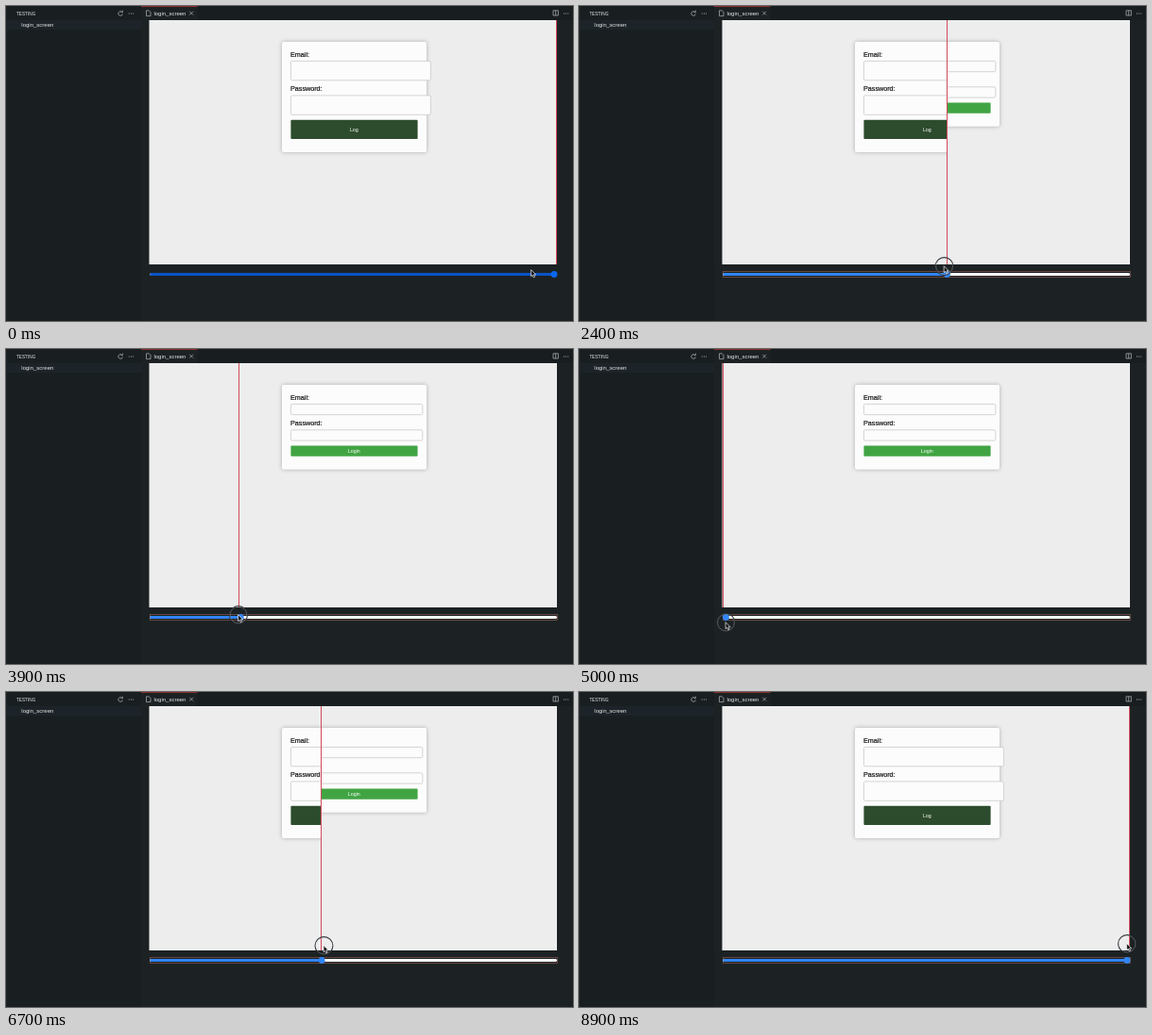
Animation of 600x334 px, one loop 9 s. Source, as an HTML page:

```html
<!DOCTYPE html>
<html lang="en">
<head>
<meta charset="utf-8">
<title>Screen comparison slider</title>
<style>
  html, body { margin: 0; width: 100%; height: 100%; overflow: hidden; background: #1c2224; }
  svg { display: block; width: 600px; height: 334px; font-family: "Liberation Sans", Arial, sans-serif; }
  .card { fill: #fcfcfc; filter: drop-shadow(0 0 2px rgba(0, 0, 0, .28)); }
  .field { fill: #fcfcfc; stroke: #c9c9c9; stroke-width: .8; }
  .label { font-size: 7.2px; fill: #111; stroke: #111; stroke-width: .2; }
  .caption { font-size: 5.3px; fill: #fff; text-anchor: middle; }
  .ui { font-size: 6px; fill: #e4e7e8; }
  .icon { fill: none; stroke: #b4b9bb; stroke-width: .7; }
  .dots { stroke: #c8cccd; stroke-width: 1; stroke-linecap: round; stroke-dasharray: 0 2.2; }
</style>
</head>
<body>
<svg viewBox="0 0 600 334">
  <defs>
    <clipPath id="stage"><rect x="151.7" y="15" width="431.3" height="259"/></clipPath>
    <clipPath id="before"><rect id="leftClip" x="151" y="15" height="259"/></clipPath>
  </defs>

  <rect width="600" height="334" fill="#1c2224"/>
  <rect width="143" height="334" fill="#191f21"/>
  <rect width="1" height="334" fill="#1f2629"/>
  <rect x="1" y="15" width="142" height="10" fill="#1d2429"/>
  <rect x="143" width="457" height="15" fill="#181e20"/>
  <rect x="143" width="59.5" height="15" fill="#1c2224"/>
  <rect x="143" width="59.5" height=".8" fill="#a8322f"/>
  <text class="ui" x="11" y="9.6" style="font-size:4.7px">TESTING</text>
  <text class="ui" x="16.3" y="22">login_screen</text>
  <text class="ui" x="156.4" y="10">login_screen</text>
  <path class="icon" d="M122.6 6.2A2.3 2.3 0 1 0 123.4 8.4M123.4 4.6V6.6H121.4M148.5 4.8H151.3L153 6.5V10.6H148.5ZM194.3 5.8L198 9.5M198 5.8L194.3 9.5M579 4.8H584.4V10H579ZM581.7 4.8V10"/>
  <path class="dots" d="M130.2 8h5M590.4 8h5"/>

  <g clip-path="url(#stage)">
    <g id="afterForm"></g>
    <g id="beforeForm" clip-path="url(#before)"></g>
    <path id="divider" d="M.5 15V274" stroke="#d04a5a"/>
  </g>

  <rect id="focus" x="152.5" y="281.5" width="431" height="6" fill="none" stroke="#7a5048" stroke-width=".8"/>
  <rect x="152.3" y="283" width="430.7" height="3" rx="1.5" fill="#fff"/>
  <rect id="fill" x="152.3" y="283" height="3" rx="1.5"/>
  <circle id="thumb" cy="284.5" r="3.4"/>
  <g id="pointer">
    <g id="ring" fill="none">
      <circle r="9.4" stroke="#23282e" stroke-width="1.1"/>
      <circle r="8.9" stroke="#fff" stroke-opacity=".4" stroke-width=".6"/>
    </g>
    <path d="M-.4 -.3V6.7L1.2 5.3L2.3 7.8L3.6 7.2L2.5 4.8H4.7Z" fill="#111" stroke="#f5f5f5" stroke-width=".7"/>
  </g>
</svg>

<script>
const $ = id => document.getElementById(id);
const set = (id, attrs) => {
  for (const name in attrs) $(id).setAttribute(name, attrs[name]);
};

// Rows flow downwards: fields and button share one height.
function form(rowH, fieldW, color, caption) {
  const field1 = 58.4;
  const label2 = field1 + rowH + 11.4;
  const field2 = label2 + 4.7;
  const button = field2 + rowH + 5.4;
  const field = y => `<rect class="field" x="301.4" y="${y}" width="${fieldW}" height="${rowH}" rx="1.5"/>`;
  return `<rect x="151" y="15" width="433" height="260" fill="#ededed"/>
    <rect class="card" x="292" y="38" width="153" height="${button + rowH - 24}" rx="2"/>
    <text class="label" x="301" y="53.5">Email:</text>${field(field1)}
    <text class="label" x="301" y="${label2}">Password:</text>${field(field2)}
    <rect x="301.4" y="${button}" width="134.2" height="${rowH}" rx="1" fill="${color}"/>
    <text class="caption" x="368.3" y="${button + rowH / 2 + 1.9}">${caption}</text>`;
}
$("beforeForm").innerHTML = form(20.4, 148, "#2d4c2d", "Log");
$("afterForm").innerHTML = form(11.3, 139.4, "#41a443", "Login");

const LEFT = 152, RIGHT = 582;
const progress = (t, from, to) => Math.min(1, Math.max(0, (t - from) / (to - from)));

// Drag strokes: start, end, divider x and pointer y reached.
const strokes = [
  [1200, 2400, 389, 276], [2400, 2800, 330, 276],
  [3100, 3900, 246, 282], [3900, 4700, LEFT, 290],
  [5100, 6000, 304, 278], [6100, 6700, 333, 269],
  [6700, 7700, 449, 265], [7900, 8900, RIGHT, 267]
];

const drag = t => strokes.reduce(([x, y], [from, to, toX, toY]) => {
  const k = progress(t, from, to);
  return [x + (toX - x) * k, y + (toY - y) * k];
}, [RIGHT, 285]);

const thumbAt = x => 155.5 + (x - LEFT) / (RIGHT - LEFT) * 424.5;

function draw(now) {
  const t = Math.floor(now % 9000 / 100) * 100;
  const [x, y] = drag(t);
  const thumbX = thumbAt(x);
  const away = 1 - progress(t, 0, 700);
  // The slider trails the pointer slightly.
  const pointerX = thumbAt(drag(t + 20)[0]) - 24 * away;
  const pressed = t >= 1300;
  const visibility = pressed ? "visible" : "hidden";

  set("leftClip", { width: x - 151 });
  set("divider", { transform: `translate(${Math.round(x)})` });
  set("fill", { width: thumbX - 152.3, fill: pressed ? "#3085f5" : "#0a53c8" });
  set("thumb", { cx: thumbX, fill: pressed ? "#3085f5" : "#0a66f0" });
  set("pointer", { transform: `translate(${pointerX} ${y - 5 * away})` });
  set("ring", { visibility });
  set("focus", { visibility });
  requestAnimationFrame(draw);
}
draw(0);
</script>
</body>
</html>
```
